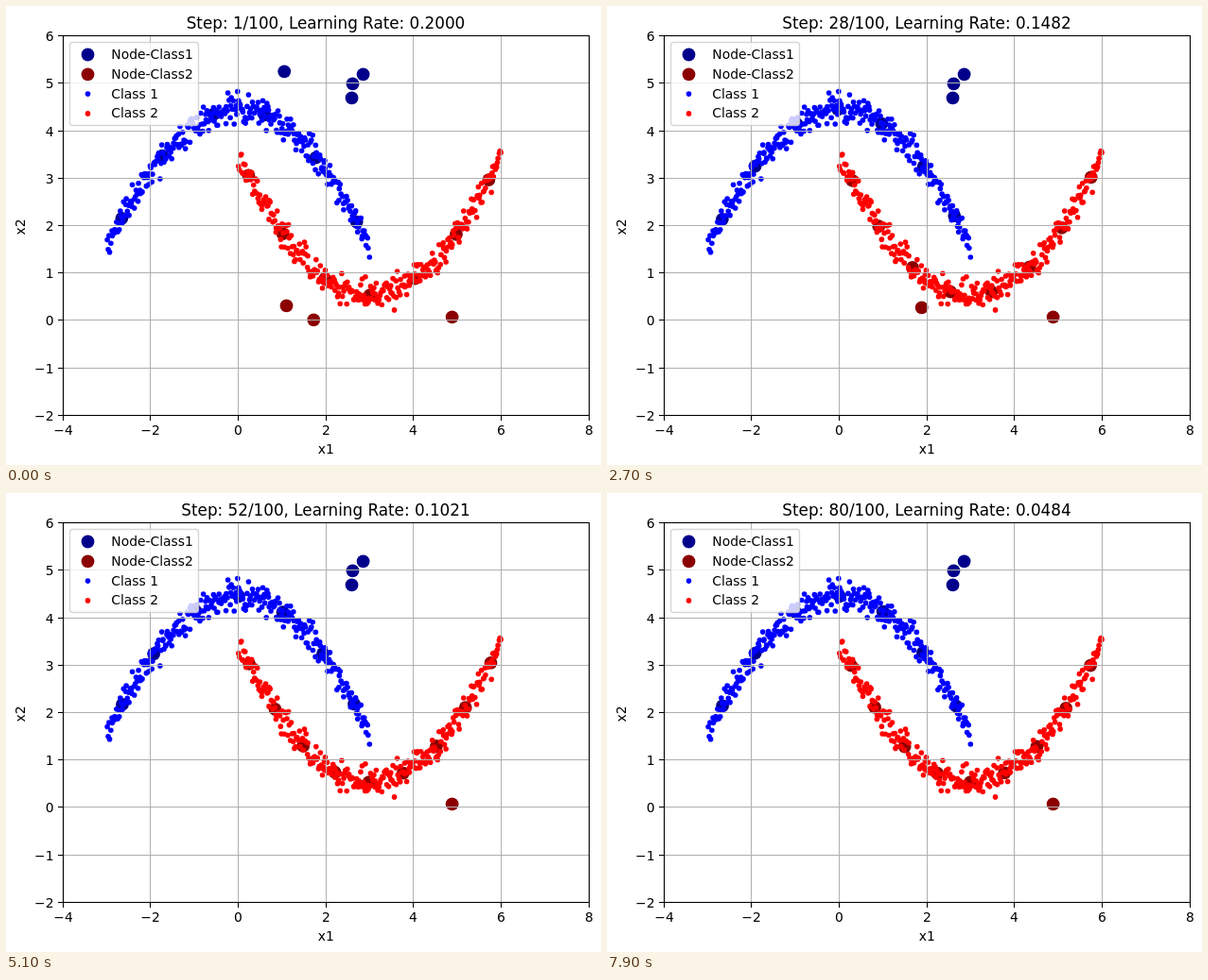
An HTML page with a canvas for the animation above (8 s loop, 629 by 486 pixels).

```html
<!DOCTYPE html>
<html lang="en">
<head>
<meta charset="utf-8">
<title>Node fitting</title>
<style>
html, body { margin: 0; width: 100%; height: 100%; overflow: hidden; background: #fff; }
canvas { display: block; }
</style>
</head>
<body>
<canvas id="plot" width="629" height="486"></canvas>
<script>
const ctx = document.getElementById('plot').getContext('2d');
const FONT = '"DejaVu Sans", Verdana, sans-serif';
const STEPS = 80, STEP_MS = 100;
const DOT = 2.8, NODE = 6.9;

const toX = v => 60.3 + 46.32 * (v + 4);
const toY = v => 31.65 + 50.2 * (6 - v);

function seeded(seed) {
  return () => {
    seed = (seed + 0x6D2B79F5) | 0;
    let r = Math.imul(seed ^ (seed >>> 15), 1 | seed);
    r = (r + Math.imul(r ^ (r >>> 7), 61 | r)) ^ r;
    return ((r ^ (r >>> 14)) >>> 0) / 4294967296;
  };
}

// Each stray node waits at its points (in data units) until the listed step,
// then joins the chain at its slot.
const groups = [
  {
    name: 'Class 1', color: '#0000ff', nodeColor: '#00008b', seed: 11,
    mid: 0, reach: 2.66, size: 7,
    curve: x => 4.45 - 0.325 * x * x,
    strays: [{ slot: 3, stops: [{ until: 4, x: 1.05, y: 5.25 }] }],
    idle: [[2.85, 5.19], [2.61, 4.99], [2.59, 4.69]]
  },
  {
    name: 'Class 2', color: '#ff0000', nodeColor: '#8b0000', seed: 29,
    mid: 3, reach: 2.74, size: 9,
    curve: x => 0.53 + 0.33 * (x - 3) ** 2,
    strays: [
      { slot: 2, stops: [{ until: 5, x: 1.1, y: 0.31 }] },
      { slot: 3, stops: [{ until: 23, x: 1.72, y: 0.01 }, { until: 31, x: 1.88, y: 0.27 }] }
    ],
    idle: [[4.88, 0.07]]
  }
];

function makeCloud({ mid, curve, seed }) {
  const rnd = seeded(seed), n = 300;
  return Array.from({ length: n }, (_, i) => {
    const x = mid - 3 + 6 * (i + rnd()) / n;
    const bell = rnd() + rnd() + rnd() + rnd() - 2;
    return [x, curve(x) + 0.27 * bell];
  });
}
for (const g of groups) g.cloud = makeCloud(g);

const rateAt = step => 0.2 - 0.19 * step / 99;

// Joined nodes share the curve, slightly denser towards both ends.
function placeNodes(g, step) {
  const out = [...g.idle], waiting = [];
  for (const { slot, stops } of g.strays) {
    const stop = stops.find(s => step < s.until);
    if (stop) {
      waiting.push(slot);
      out.push([stop.x, stop.y]);
    }
  }
  const last = g.size - waiting.length - 1;
  for (let i = 0; i <= last; i++) {
    const t = 2 * i / last - 1;
    const sway = seeded(g.seed + i * 977 + step * 131)() - 0.5;
    const x = g.mid + g.reach * t * (1.14 - 0.14 * t * t) + 0.45 * rateAt(step) * sway;
    out.push([x, g.curve(x)]);
  }
  return out;
}

function dot(x, y, r, color) {
  ctx.fillStyle = color;
  ctx.beginPath();
  ctx.arc(x, y, r, 0, 2 * Math.PI);
  ctx.fill();
}

function scatter(pts, r, color) {
  for (const [x, y] of pts) dot(toX(x), toY(y), r, color);
}

function rect(x, y, w, h, color) {
  ctx.fillStyle = color;
  ctx.fillRect(x, y, w, h);
}

function text(str, x, y, size = 13.89, align = 'center') {
  ctx.font = size + 'px ' + FONT;
  ctx.textAlign = align;
  ctx.fillStyle = '#000';
  ctx.fillText(str, x, y);
}

const label = v => String(v).replace('-', '\u2212');

function drawAxes() {
  for (let v = -4; v <= 8; v += 2) {
    const x = Math.floor(toX(v));
    rect(x, 31, 1, 403, '#b0b0b0');
    rect(x, 434, 1, 5, '#000');
    text(label(v), x + 0.5, 454);
  }
  for (let v = -2; v <= 6; v++) {
    const y = Math.floor(toY(v));
    rect(60, y, 557, 1, '#b0b0b0');
    rect(55, y, 5, 1, '#000');
    text(label(v), 50.5, y + 5.5, 13.89, 'right');
  }
  ctx.strokeStyle = '#000';
  ctx.lineWidth = 1.11;
  ctx.strokeRect(60.5, 31.5, 556, 402);
  text('x1', 338.3, 474);
  ctx.save();
  ctx.translate(20, 234);
  ctx.rotate(-Math.PI / 2);
  text('x2', 0, 0);
  ctx.restore();
}

function drawLegend() {
  ctx.beginPath();
  ctx.roundRect(67.5, 38.5, 136, 88, 3);
  ctx.fillStyle = 'rgba(255,255,255,0.8)';
  ctx.fill();
  ctx.strokeStyle = 'rgba(204,204,204,0.8)';
  ctx.lineWidth = 1.39;
  ctx.stroke();
  const rows = [
    ...groups.map(g => ['Node-' + g.name.replace(' ', ''), g.nodeColor, NODE]),
    ...groups.map(g => [g.name, g.color, DOT])
  ];
  rows.forEach(([name, color, r], i) => {
    const y = 51.5 + i * 20.8;
    dot(86.5, y, r, color);
    text(name, 111.3, Math.round(y + 4.5), 13.89, 'left');
  });
}

function draw(now) {
  const step = Math.floor(now / STEP_MS) % STEPS;
  rect(0, 0, 629, 486, '#fff');
  for (const g of groups) scatter(placeNodes(g, step), NODE, g.nodeColor);
  for (const g of groups) scatter(g.cloud, DOT, g.color);
  drawAxes();
  drawLegend();
  text(`Step: ${step + 1}/100, Learning Rate: ${rateAt(step).toFixed(4)}`, 338, 24, 16.8);
}

const begin = performance.now();
function tick() {
  draw(performance.now() - begin);
  requestAnimationFrame(tick);
}
tick();
</script>
</body>
</html>
```
